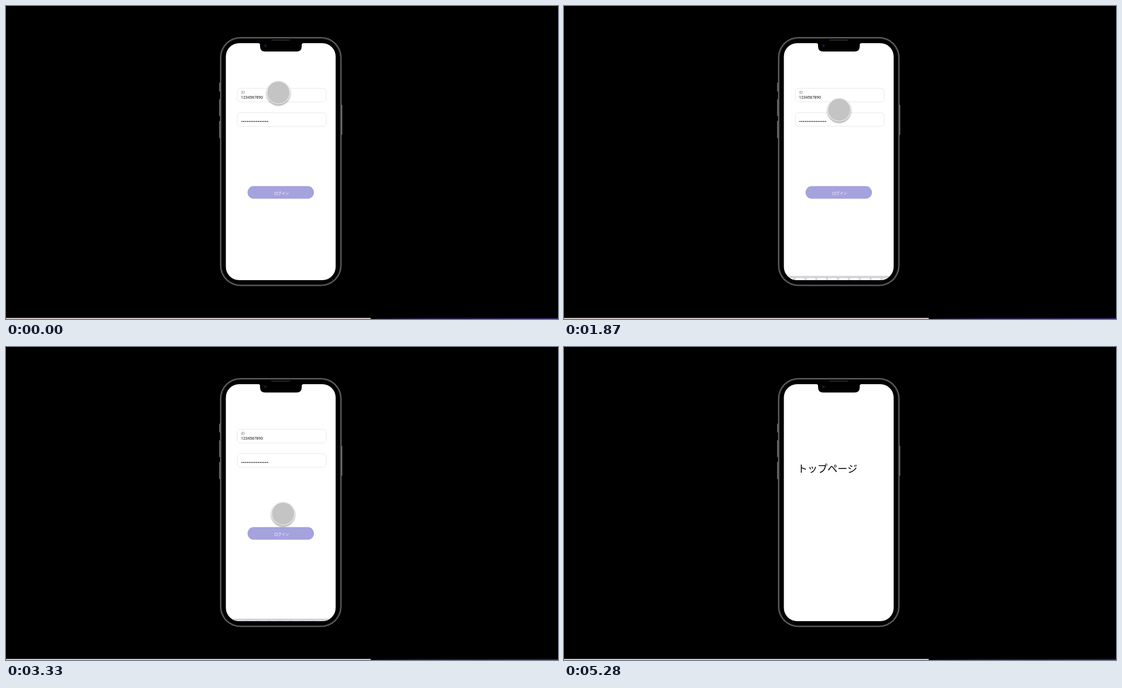
An HTML page that plays this animation: 993 by 564 pixels, repeating every 5.35 s.

```html
<!DOCTYPE html>
<html lang="ja">
<head>
<meta charset="utf-8">
<style>
  html, body { margin: 0; width: 100%; height: 100%; overflow: hidden; background: #000; }
  svg { display: block; }
  text { font-family: Inter, Roboto, sans-serif; }
  .jp { font-family: "Noto Sans CJK JP", "Noto Sans CJK", sans-serif; }
  .mid { text-anchor: middle; }
  .field rect { fill: #fff; stroke: #e7e7e7; stroke-width: 1; }
  #cursor { filter: drop-shadow(0 2.5px 1.8px rgba(0, 0, 0, .38)); }
</style>
</head>
<body>
<svg width="993" height="564" viewBox="0 0 993 564">
  <defs>
    <clipPath id="screen"><rect x="395.5" y="67" width="197.5" height="427" rx="24"/></clipPath>
    <linearGradient id="edge">
      <stop offset="0" stop-color="#0b0916"/>
      <stop offset=".25" stop-color="#1c153a"/>
      <stop offset="1" stop-color="#2a1f58"/>
    </linearGradient>
  </defs>

  <!-- desktop edge -->
  <rect y="562" width="656" height="2" fill="#d3cbcb"/>
  <rect x="664" y="562" width="329" height="2" fill="url(#edge)"/>

  <!-- phone body -->
  <g fill="#626262">
    <rect x="383.3" y="138" width="3" height="16" rx="1"/>
    <rect x="383.3" y="168" width="3" height="30.5" rx="1"/>
    <rect x="383.3" y="207" width="3" height="31" rx="1"/>
    <rect x="602" y="178" width="3" height="54" rx="1"/>
  </g>
  <rect x="385" y="56" width="218.6" height="448.6" rx="37" fill="#747474"/>
  <rect x="386.3" y="57.3" width="216" height="446" rx="35.7" fill="#333"/>
  <rect x="388" y="59" width="212.6" height="442.6" rx="34"/>
  <rect x="477" y="60" width="34" height="3" rx="1.5" fill="#1b1b1b"/>

  <g clip-path="url(#screen)">
    <rect x="395" y="67" width="199" height="428" fill="#fff"/>
    <g id="login">
      <g class="field">
        <rect x="416" y="148.3" width="160" height="24.5" rx="5.5"/>
        <rect x="416" y="192.2" width="160" height="24.5" rx="5.5"/>
      </g>
      <text x="423" y="157.8" font-size="6.8" fill="#777">ID</text>
      <text x="422.8" y="167" font-size="7" style="font-family:Roboto,sans-serif" fill="#111">1234567890</text>
      <path d="M424.6 208H471" stroke="#2b2b2b" stroke-width="2.2" stroke-linecap="round" stroke-dasharray="0 3.28"/>
      <rect x="434.5" y="324.6" width="119.5" height="22.6" rx="11.3" fill="#a5a2de"/>
      <text class="jp mid" x="495.8" y="340.2" font-size="6.8" fill="#fff">ログイン</text>
    </g>
    <text id="top" class="jp" x="420" y="226" font-size="18">トップページ</text>
    <g id="keyboard"></g>
    <g id="cursor"><circle r="21.2" fill="#fff"/><circle r="20" fill="#c4c4c4"/><circle r="20.9" fill="none" stroke="#ccc" stroke-width=".5"/></g>
  </g>
  <path d="M453 66.5Q457 67 457 70V72.5Q457 82 466.500 82H522.500Q532 82 532 72.500V70Q532 67 536 66.500Z"/>
  <circle cx="466.700" cy="71.500" r="3" fill="#0e0f1e"/>
  <circle cx="466.700" cy="71.500" r="1.300" fill="#1c2048"/>

  <g id="status">
    <path d="M0 541H321.500Q325.500 541 325.500 545V562H0Z" fill="#dee1e6"/>
    <text class="jp" x="135" y="556.700" font-size="11" fill="#53575c" text-anchor="end" style="font-feature-settings:'palt'">安全な接続を確立しています...</text>
  </g>
</svg>
<script>
const LOOP = 5350, KEYBOARD_HEIGHT = 101;
const $ = id => document.getElementById(id);

// Keyboard: keys are placed by their centre
const rect = (x, y, w, h, fill, r = 2.8) =>
  `<rect x="${x}" y="${y}" width="${w}" height="${h}" rx="${r}" fill="${fill}"/>`;
const label = (s, x, y, size, fill = '#111') =>
  `<text class="mid" x="${x}" y="${y}" font-size="${size}" fill="${fill}">${s}</text>`;
const key = (cx, y, w, fill = '#fff') =>
  rect(cx - w / 2, y + 1, w, 20, '#9a9da3') + rect(cx - w / 2, y, w, 20, fill);
const row = (letters, x, y, step, w) => [...letters].map((s, i) =>
  (w ? key(x + i * step, y, w) : '') + label(s, x + i * step, y + 14, 11)).join('');
const GREY = '#adb3bc';

$('keyboard').innerHTML =
  rect(395, 393, 199, 102, '#d0d3d9', 0) +
  row('QWERTYUIOP', 405, 397, 19.55, 17) +
  row('ASDFGH', 405, 422, 19.7, 17) +
  key(552.3, 422, 75.5) + row('JKLÑ', 523, 422, 19.1) +
  '<path d="M533.3 423v18M553.7 423v18M573 423v18" stroke="#e4e6e9" stroke-width=".8"/>' +
  key(405.8, 447, 19.5) +
  '<path d="M406 452.500L411 457.500H408.300V461.500H403.700V457.500H401Z"/>' +
  row('ZXCVBNM', 430.800, 447, 20.850, 17.500) +
  key(582, 447, 20, GREY) +
  `<g fill="none" stroke="#222" stroke-width=".9">
    <path d="M576.500 457L580 453.200H587.500V460.800H580ZM581.800 455.300l3.400 3.400m0-3.400l-3.400 3.400"/>
    <circle cx="427.500" cy="482.500" r="4.500"/><path d="M424.700 483.500q2.800 4.500 5.600 0Z"/></g>`
    .replace(/^/, key(402.5, 472.5, 25, GREY) + key(427.5, 472.5, 19, GREY) + key(447.5, 472.5, 15, GREY)) +
  '<circle cx="425.800" cy="481" r=".7"/><circle cx="429.200" cy="481" r=".7"/>' +
  rect(446, 477.5, 3, 6.5, '#222', 1.5) +
  '<path d="M444.600 482q0 3.600 2.900 3.600t2.900-3.600M447.500 485.600v2.200M445.800 487.800h3.400" fill="none" stroke="#222" stroke-width=".8"/>' +
  key(503, 472.5, 90) + key(572.5, 472.5, 43, '#1174ee') +
  label('123', 405.5, 485.2, 7.3) +
  label('espacio', 490.5, 485.2, 7.3) +
  label('intro', 571.5, 485.2, 7.4, '#fff');

// Time, x, y
const path = [
  [0, 490, 156], [69, 490, 156], [70, 488, 155], [1560, 488, 155],
  [1730, 493, 174], [1870, 495, 187], [2000, 493.5, 198], [2960, 493.5, 198],
  [3330, 498.5, 300], [3530, 500.5, 351], [3620, 500.8, 355],
  [4010, 503.7, 333.5], [LOOP, 503.7, 333.5]
];
const clamp = v => Math.min(1, Math.max(0, v));
const ease = v => v < .5 ? 2 * v * v : 1 - 2 * (1 - v) ** 2;
const slide = (t, start) => ease(clamp((t - start) / 480));

function cursorAt(t) {
  const i = path.findIndex(p => p[0] > t);
  const [t0, x0, y0] = path[i - 1], [t1, x1, y1] = path[i];
  const k = (t - t0) / (t1 - t0);
  return [x0 + (x1 - x0) * k, y0 + (y1 - y0) * k];
}

function draw(now) {
  const t = now % LOOP;
  const shown = slide(t, 450) - slide(t, 1490) + slide(t, 2130) - slide(t, 2930);
  const fade = 1 - clamp((t - 4440) / 400);
  const home = t >= 4140;
  $('keyboard').setAttribute('transform', `translate(0 ${(1 - shown) * (KEYBOARD_HEIGHT + 1)})`);
  $('cursor').setAttribute('transform', `translate(${cursorAt(t)})`);
  $('cursor').style.opacity = fade;
  $('login').style.display = home ? 'none' : '';
  $('top').style.display = home ? '' : 'none';
  $('status').style.opacity = home ? fade : 0;
}

const start = performance.now();
(function tick() {
  draw(performance.now() - start);
  requestAnimationFrame(tick);
})();
</script>
</body>
</html>
```
